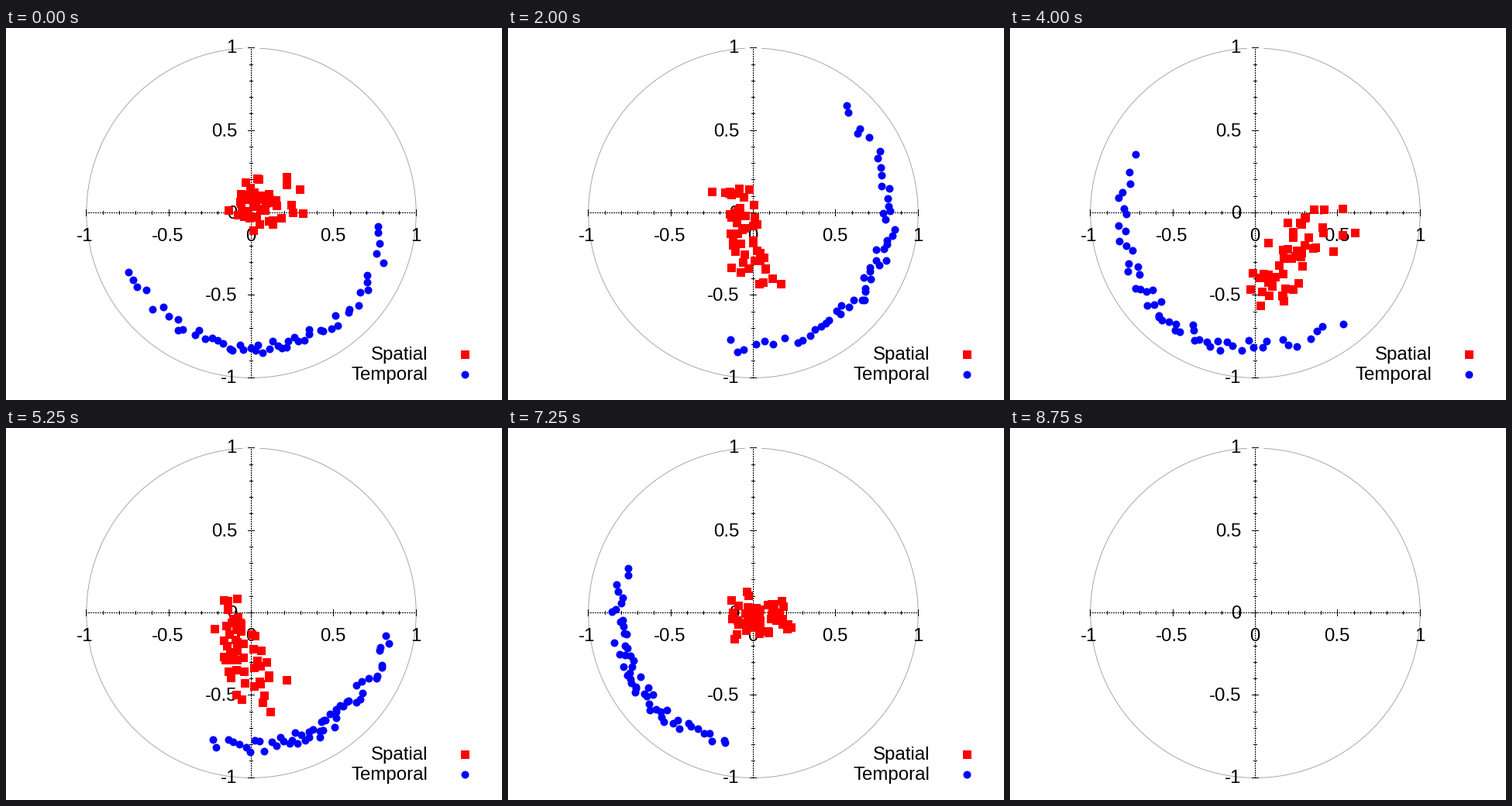
A matplotlib script for the animation above (9000 ms loop, 640x480 px).

```python
import matplotlib.pyplot as plt
import numpy as np
from matplotlib.animation import FuncAnimation

W, H, DPI = 640, 480, 100
PX = 72 / DPI
FRAMES, INTERVAL = 36, 250
CX, CY, R = 316, 238, 212.7
N = 52

plt.rcParams["font.family"] = "Liberation Sans"


def to_px(x, y):
    """Plot units to whole pixels."""
    pts = np.column_stack([CX + R * np.asarray(x), CY - R * np.asarray(y)])
    return np.round(pts)


def temporal(k):
    """An arc of points that turns clockwise while its width breathes."""
    rng = np.random.default_rng(100 + k)
    mid = np.interp(k, [0, 4, 21, 25, 29, 35], [280, 205, -778, -930, -870, -910])
    half = 62 + 16 * np.cos(np.pi * k / 4)
    u = 2 * (np.arange(N) + rng.random(N)) / N - 1
    a = np.radians(mid + half * u * (.65 + .35 * u ** 2))
    r = rng.uniform(.775, .865, N)
    return to_px(r * np.cos(a), r * np.sin(a))


def spatial(k):
    """A cloud scattered along a short segment that wanders and tilts."""
    rng = np.random.default_rng(500 + k)

    def at(*vals):
        return np.interp(k, [0, 4, 8, 16, 21, 29], vals)

    cx, cy = at(.07, .20, -.04, .25, -.03, .04), at(.04, .27, -.12, -.22, -.25, -.02)
    dx, dy = at(.15, .12, .09, .21, .13, .15), at(.05, .22, -.24, .24, -.25, .02)
    t = rng.uniform(-1, 1, N)
    nx, ny = np.clip(rng.normal(0, .075, (2, N)), -.15, .15)
    return to_px(cx + dx * t + nx, cy + dy * t + ny)


fig = plt.figure(figsize=(W / DPI, H / DPI), dpi=DPI, facecolor="white")
ax = fig.add_axes([0, 0, 1, 1])
ax.set(xlim=(0, W), ylim=(H, 0))
ax.axis("off")


def line(x, y, **kw):
    ax.plot(x, y, color="black", lw=PX, antialiased=False, **kw)


def label(x, y, s, ha):
    return ax.text(x, y, s, ha=ha, va="baseline", fontsize=24 * PX, zorder=3)


def dots(marker, size, color, pts):
    pts = np.asarray(pts)
    return ax.scatter(pts[:, 0], pts[:, 1], s=(size * PX) ** 2, marker=marker,
                      c=color, linewidths=0, antialiased=False, zorder=5)


# Unit circle, open at the top
t = np.radians(np.linspace(93, 447, 400))
ax.plot(CX + .5 + R * np.cos(t), CY + .7 - R * np.sin(t),
        color="#a0a0a0", lw=.9 * PX, zorder=1)

# Axes and ticks
line([103, 529], [CY, CY], ls=(0, (2, 2)))
line([CX, CX], [451, 26], ls=(0, (2, 2)))
for i in range(-10, 11):
    major = i % 5 == 0
    half = 4 if major else 2
    x, y = to_px([i / 10], [i / 10])[0]
    line([x, x], [CY - half, CY + half])
    line([CX - half, CX + half], [y, y])
    if major:
        s = f"{i / 10:g}"
        label(x - (1 if i < 0 else 0), 275, s, "center")
        label(298, y + 7.5, s, "right")

legend = [
    label(544.5, 428, "Spatial", "right"),
    label(544, 454, "Temporal", "right"),
    dots("s", 11, "red", [(592, 421)]),
    dots("o", 10, "blue", [(592, 447)]),
]
red = dots("s", 11, "red", spatial(0))
blue = dots("o", 10, "blue", temporal(0))


def update(k):
    # The last step shows the bare axes.
    shown = k < FRAMES - 1
    for art in [*legend, red, blue]:
        art.set_visible(shown)
    if shown:
        red.set_offsets(spatial(k))
        blue.set_offsets(temporal(k))
    return [*legend, red, blue]


anim = FuncAnimation(fig, update, frames=FRAMES, interval=INTERVAL,
                     repeat=True, repeat_delay=0, blit=False)
plt.show()
```
